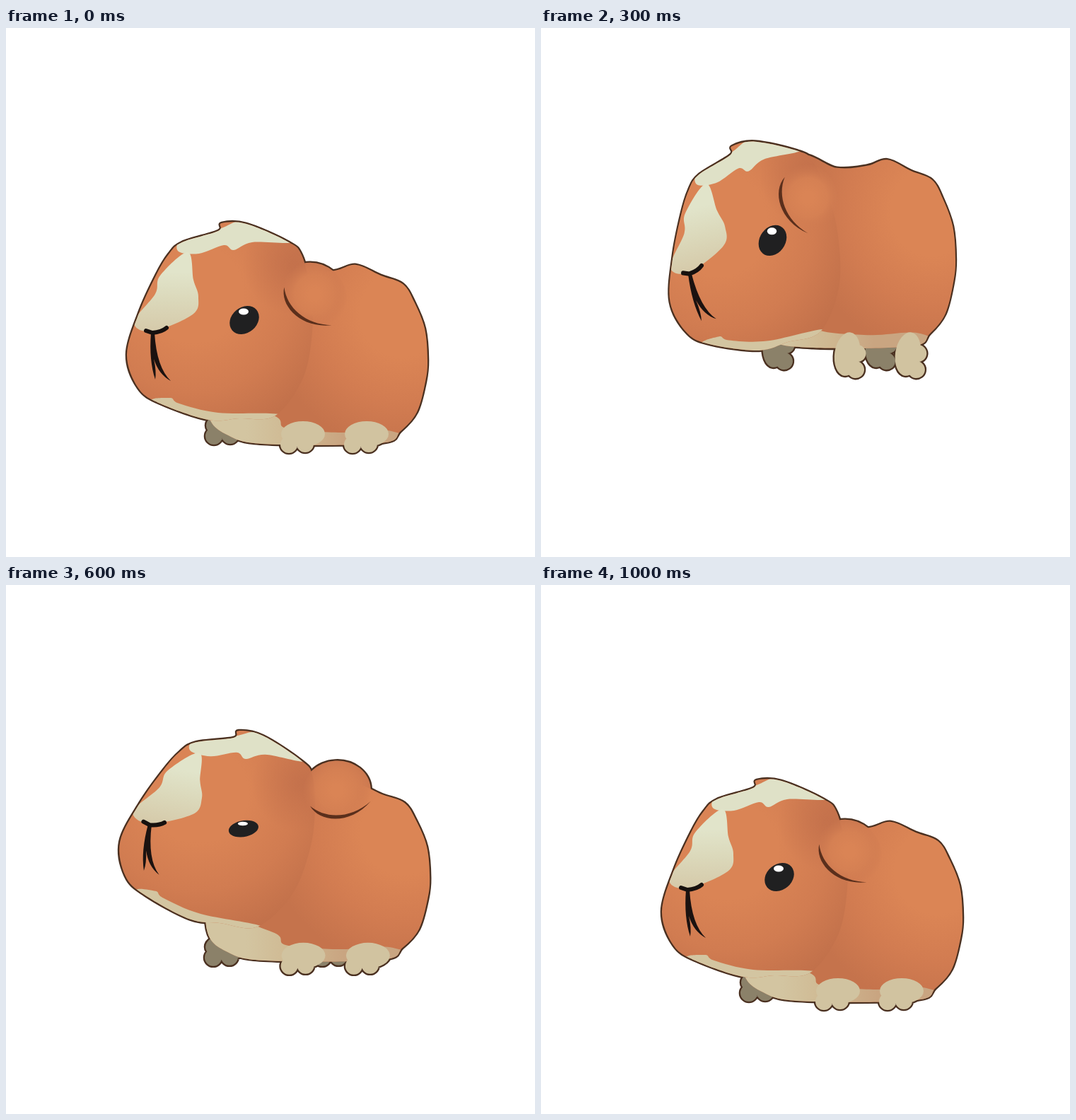
Animation, 748 px wide and 748 px high, one loop 1.05 s. Source, as an HTML page with a canvas:

```html
<!DOCTYPE html>
<html lang="en">
<head>
<meta charset="utf-8">
<title>Hopping guinea pig</title>
<style>
html, body { margin: 0; width: 100%; height: 100%; overflow: hidden; background: #fff; }
canvas { display: block; }
</style>
</head>
<body>
<canvas id="stage" width="748" height="748"></canvas>
<script>
const ctx = document.getElementById('stage').getContext('2d');
const LOOP = 1050, STEP = 50;
const MID = 381, FLOOR = 589, CROUCH = 592, APEX = 400;
const RAD = Math.PI / 180;

// Smooth hill of height 1 around a moment, zero beyond its width.
function bump(t, peak, width) {
  const d = Math.abs(t - peak) / width;
  return d < 1 ? Math.cos(d * Math.PI / 2) ** 2 : 0;
}

// Quick rise after landing, then a slow return to rest.
function rebound(t) {
  const u = Math.min(1, Math.max(0, (t - 650) / 350));
  return Math.sin(Math.PI * Math.sqrt(u));
}

function baseAt(t) {
  const drop = CROUCH - APEX;
  if (t < 100) return FLOOR + (CROUCH - FLOOR) * t / 100;
  if (t < 430) return APEX + drop * (1 - (t - 100) / 330) ** 1.4;
  if (t < 455) return APEX;
  if (t < 630) return APEX + drop * ((t - 455) / 175) ** 2;
  return t < 700 ? CROUCH - 13 * rebound(t) : FLOOR - 13 * rebound(t);
}

function poseAt(t) {
  const back = rebound(t), base = baseAt(t), height = FLOOR - base;
  const sx = 1 + .06 * bump(t, 100, 100) - .07 * bump(t, 430, 330) + .0775 * bump(t, 650, 118) - .02 * back;
  const nod = -12.2 * bump(t, 300, 197) + 10.3 * bump(t, 605, 159) + 3 * back;
  const ear = 40 + 29 * bump(t, 300, 290) - 56 * bump(t, 695, 300);
  const tuck = Math.sqrt(bump(t, 340, 250));
  return {
    base, sx, sy: 2 - sx, nod, ear,
    lean: Math.max(0, Math.min(8, height / 6)),
    open: 1 - .22 * bump(t, 170, 130) + .14 * bump(t, 430, 200) - .45 * bump(t, 625, 125) - .18 * back,
    pawTurn: -84 * tuck,
    pawX: -1.6 * nod * tuck,
    pawY: Math.min(height - 11, -4 + 14 * tuck),
    // the ear slides along the head as it swings
    earX: 92 - .0175 * (ear + 12) ** 2,
    earY: -192 - 45 * ((69 - ear) / 81) ** 3
  };
}

// Closed smooth curve through the points.
function blob(text) {
  const p = text.trim().split(/\s+/).map(s => s.split(',').map(Number));
  const at = i => p[(i + p.length) % p.length];
  const path = new Path2D();
  path.moveTo(...p[0]);
  p.forEach((b, i) => {
    const a = at(i - 1), c = at(i + 1), d = at(i + 2);
    path.bezierCurveTo(b[0] + (c[0] - a[0]) / 6, b[1] + (c[1] - a[1]) / 6,
      c[0] - (d[0] - b[0]) / 6, c[1] - (d[1] - b[1]) / 6, c[0], c[1]);
  });
  path.closePath();
  return path;
}

function oval(x, y, rx, ry, path = new Path2D()) {
  path.moveTo(x + rx, y);
  path.ellipse(x, y, rx, ry, 0, 0, 7);
  return path;
}

function blend(gradient, colors) {
  colors.forEach((c, i) => gradient.addColorStop(i / (colors.length - 1), c));
  return gradient;
}
const glow = (x, y, r0, r1, ...colors) => blend(ctx.createRadialGradient(x, y, r0, x, y, r1), colors);
const ramp = (x0, y0, x1, y1, ...colors) => blend(ctx.createLinearGradient(x0, y0, x1, y1), colors);

const shapes = {
  body: blob(`284,535 318,578 385,589 530,587 558,570 581,543 593,500 596,470 592,425
    577,387 561,362 530,350 495,335 465,343 420,346 360,330 302,400`),
  belly: blob('260,515 376,547 396,566 470,572 545,570 590,600 420,615 260,600'),
  head: blob(`305,276 340,277 398,302 418,321 431,375 433,430 420,495 381,548 330,552
    286,554 218,531 187,509 171,462 188,403 212,350 230,320 249,303 300,287`),
  chin: blob('205,531 232,523 245,531 300,544 390,547 385,570 280,580'),
  crest: blob('244,316 249,300 302,284 340,273 405,302 348,303 322,314 308,307 273,319'),
  blaze: blob('257,317 265,356 272,380 264,405 207,429 181,416 211,376 218,350'),
  ear: oval(-4, -21, 48, 42),
  fold: new Path2D('M-43 -1C-31 23 12 29 43 -3C14 20 -22 19 -43 -1Z'),
  mouth: new Path2D('M205 431Q202 470 211 497Q213 486 209 468Q216 490 233 499Q213 480 210 431Z'),
  nose: new Path2D('M198 428L207 431Q220 430 227 424'),
  eye: new Path2D(),
  glint: oval(-1, -12, 7, 4.6),
  paw: oval(3, 10, 12, 12, oval(-20, 11, 12, 12, oval(0, -4, 31, 18)))
};
shapes.eye.ellipse(0, 0, 22.5, 18, -40 * RAD, 0, 7);

const fills = {
  body: glow(560, 405, 60, 190, '#db8555', '#d27c51', '#c5734c'),
  belly: ramp(340, 0, 475, 0, '#d3c5a1', '#cfb891', '#c9a581'),
  head: glow(265, 375, 70, 210, '#da8455', '#d17c51', '#c1704a'),
  temple: glow(405, 335, 5, 70, 'rgba(192,110,74,.7)', 'rgba(192,110,74,0)'),
  blaze: ramp(0, 345, 0, 425, '#e1e4ca', '#dbd8ba', '#d6cbab'),
  ear: glow(0, -18, 8, 50, '#da8455', '#d58053', '#ca774f'),
  earTop: glow(-4, -21, 8, 48, '#da8455', '#d58053', 'rgba(205,121,80,0)')
};

function paint(shape, fill) {
  ctx.fillStyle = fill;
  ctx.fill(shape);
}

function within(place, draw) {
  ctx.save();
  place();
  draw();
  ctx.restore();
}

// Ways to move the pen onto each part of the animal.
function placesFor(p) {
  const body = () => {
    ctx.translate(MID, p.base);
    ctx.scale(p.sx, p.sy);
    ctx.translate(-MID, -FLOOR);
  };
  const paw = (x, y) => () => {
    ctx.translate(MID + p.pawX + x * p.sx, p.base + p.pawY + y);
    ctx.rotate(p.pawTurn * RAD);
  };
  return {
    body,
    head() {
      body();
      ctx.translate(452 - p.lean, 445 + .75 * p.lean);
      ctx.rotate(p.nod * RAD);
      ctx.translate(-452, -445);
    },
    ear() {
      ctx.translate(MID + p.earX * p.sx, p.base + p.earY * p.sy);
      ctx.rotate(p.ear * RAD);
    },
    far: [paw(-67, -12), paw(85, -12)],
    near: [paw(39, 0), paw(129, 0)]
  };
}

function drawBody() {
  paint(shapes.body, fills.body);
  ctx.clip(shapes.body);
  paint(shapes.belly, fills.belly);
}

function drawHead(p) {
  paint(shapes.head, fills.head);
  paint(shapes.head, fills.temple);
  within(() => ctx.clip(shapes.head), () => {
    paint(shapes.chin, '#d3c5a1');
    paint(shapes.crest, '#dfe1c7');
    paint(shapes.blaze, fills.blaze);
  });
  paint(shapes.mouth, '#1b1210');
  ctx.strokeStyle = '#17110f';
  ctx.lineWidth = 6;
  ctx.stroke(shapes.nose);

  ctx.translate(337, 413);
  ctx.rotate(-p.nod * RAD);
  ctx.scale(1, p.open);
  paint(shapes.eye, '#202021');
  paint(shapes.glint, '#fff');
}

function render(t) {
  const p = poseAt(t), at = placesFor(p);
  ctx.fillStyle = '#fff';
  ctx.fillRect(0, 0, 748, 748);
  ctx.lineCap = ctx.lineJoin = 'round';

  // one dark rim around the whole figure
  ctx.strokeStyle = '#4a3020';
  ctx.lineWidth = 4.6;
  const rim = (place, shape) => within(place, () => ctx.stroke(shape));
  [...at.far, ...at.near].forEach(place => rim(place, shapes.paw));
  ['body', 'head', 'ear'].forEach(part => rim(at[part], shapes[part]));

  at.far.forEach(place => within(place, () => paint(shapes.paw, '#8b8169')));
  within(at.ear, () => paint(shapes.ear, fills.ear));
  within(at.body, drawBody);
  within(at.head, () => drawHead(p));
  within(at.ear, () => {
    paint(shapes.ear, fills.earTop);
    paint(shapes.fold, '#5a2f1c');
  });
  at.near.forEach(place => within(place, () => paint(shapes.paw, '#d1c3a0')));
}

const start = performance.now();
function tick() {
  const t = (performance.now() - start) % LOOP;
  render(Math.floor(t / STEP) * STEP);
  requestAnimationFrame(tick);
}
tick();
</script>
</body>
</html>
```
